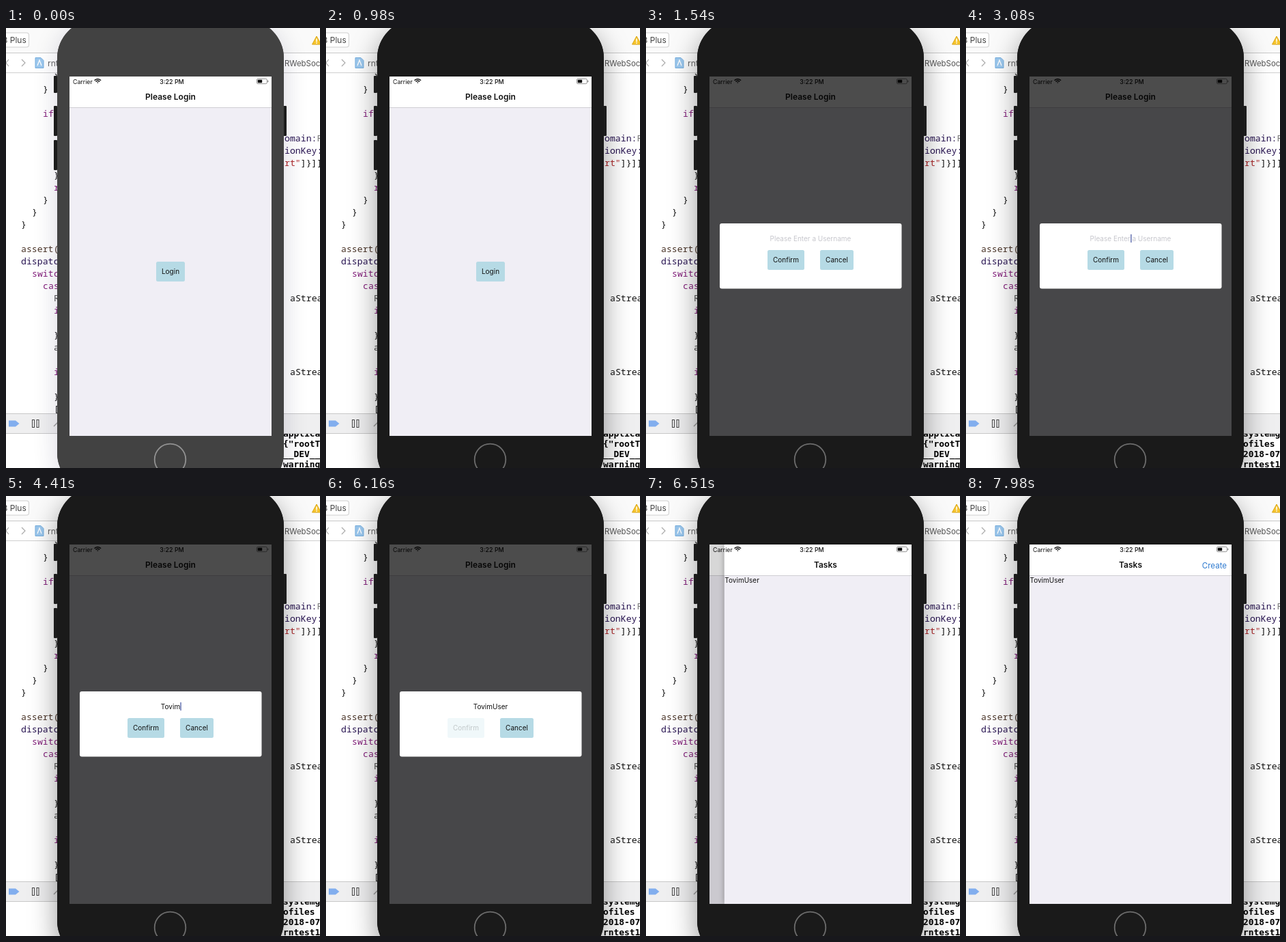
Recreate the animation shown at these times as an HTML page with a canvas. Size 460 by 644 pixels, loop 8 s.

```html
<!DOCTYPE html>
<html lang="en">
<head>
<meta charset="utf-8">
<title>Login flow</title>
<style>
html, body { margin: 0; width: 460px; height: 644px; overflow: hidden; background: #fff; }
canvas { display: block; }
</style>
</head>
<body>
<canvas id="stage" width="460" height="644"></canvas>
<script>
const ctx = document.getElementById('stage').getContext('2d');
const LOOP = 8000;
const MONO = '500 13.2px "Noto Sans Mono", "DejaVu Sans Mono", monospace';
const LOG = 'bold 12.9px "DejaVu Sans Mono", monospace';
const ui = (size, weight = 400) => `${weight} ${size}px Inter, Roboto, sans-serif`;
const INK = '#111', KEYWORD = '#84207c', CALL = '#261250', PAPER = '#f0eef5', SKY = '#b6dae5';
const SCREEN = { x: 93, y: 71, w: 296, h: 526 };
const USER = 'TovimUser';

// Event times in ms
const ACTIVATE = 700, PRESS_LOGIN = 1120, OPEN = 1210, FOCUS = 2600;
const PRESS_CONFIRM = 6080, PUSH = 6260, CREATE = 6720;
const KEYS = [3150, 3400, 3650, 3900, 4150, 4500, 4750, 5000, 5250];

const clamp = v => Math.min(1, Math.max(0, v));
const progress = (t, start, length) => clamp((t - start) / length);
const easeOut = p => 1 - (1 - p) ** 3;

function text(str, x, y, font, color = INK, align = 'left') {
  ctx.font = font;
  ctx.fillStyle = color;
  ctx.textAlign = align;
  ctx.fillText(str, x, y);
}

function rect(x, y, w, h, color, radius = 0) {
  ctx.fillStyle = color;
  ctx.beginPath();
  ctx.roundRect(x, y, w, h, radius);
  ctx.fill();
}

function poly(points, fill, stroke, width = 1) {
  ctx.beginPath();
  points.forEach(([x, y]) => ctx.lineTo(x, y));
  if (fill) {
    ctx.fillStyle = fill;
    ctx.fill();
  }
  if (stroke) {
    ctx.strokeStyle = stroke;
    ctx.lineWidth = width;
    ctx.stroke();
  }
}

function layer(draw, alpha = 1) {
  ctx.save();
  ctx.globalAlpha *= alpha;
  draw();
  ctx.restore();
}

const CODE = [
  [70, 72, '}'], [54, 90, '}'], [54, 126, 'if', KEYWORD], [70, 216, '}'], [70, 234, 'r', KEYWORD],
  [54, 252, '}'], [38, 270, '}'], [22, 288, '}'], [22, 324, 'assert(', '#4a3428'],
  [22, 342, 'dispatch', CALL], [38, 360, 'switch', KEYWORD], [54, 378, 'case', KEYWORD],
  [70, 396, 'R', '#555'], [70, 414, 'i', KEYWORD], [70, 450, '}'], [70, 468, 'a', '#444'],
  [70, 504, 'i', KEYWORD], [70, 540, '}'], [70, 558, '['],
  [408, 162, 'omain:', CALL], [455.5, 162, 'R', '#777'], [408, 180, 'ionKey:', CALL],
  [408, 198, 'rt"', '#b0282a'], [431.8, 198, ']}]]'], [416, 396, 'aStrea'], [416, 504, 'aStrea'],
];

function drawEditor(t) {
  rect(0, 0, 460, 644, '#fff');
  CODE.forEach(([x, y, str, color]) => text(str, x, y + 3.5, MONO, color));

  rect(0, 0, 460, 36, '#fafafa');
  rect(0, 36, 460, 1, '#c9c9c9');
  rect(0, 37, 460, 29, '#fff');
  rect(0, 65, 460, 1, '#cfcfcf');
  rect(-10, 6.5, 44, 22, '#cfcfcf', 4);
  rect(-10, 7.5, 43, 20, '#fff', 3);
  text('8 Plus', -5, 22, ui(12), '#444');
  poly([[455, 12], [461.5, 24], [448.5, 24], [455, 12]], '#f7c52d', '#d9a514');
  rect(454.3, 15.5, 1.5, 5, '#fff');
  rect(454.3, 21.5, 1.5, 1.5, '#fff');
  poly([[4, 46], [0, 51], [4, 56]], null, '#aaa', 1.2);
  poly([[23, 46], [28, 51], [23, 56]], null, '#aaa', 1.2);

  const faded = t > 1190 && t < 1400;
  poly([[43, 43.5], [51, 43.5], [55, 47.5], [55, 58.5], [43, 58.5], [43, 43.5]],
    faded ? '#c9c9d2' : '#9cc8ee', faded ? '#b0b0b8' : '#76aede');
  poly([[46, 55], [49, 47], [52, 55]], null, '#fff', 1.3);
  text('rntest1', 61, 55.5, ui(12), '#666');
  text('RWebSocket', 408, 55.5, ui(11.4), '#555');

  const log = t < FOCUS
    ? ['application', '{"rootTag', '__DEV__ ', 'warning ']
    : ['systemgroup', 'ofiles p', '2018-07-', 'rntest1['];
  log.forEach((line, i) => text(line, 406, 598 + i * 15, LOG, '#000'));

  rect(0, 564, 460, 29, '#efeff0');
  rect(0, 564, 460, 1, '#c8c8c8');
  rect(0, 593, 460, 1, '#c8c8c8');
  poly([[4, 574.5], [14, 574.5], [19.5, 579], [14, 583.5], [4, 583.5]], faded ? '#bcbcc8' : '#82aeee');
  for (const x of [39, 45.5]) {
    ctx.strokeStyle = '#444';
    ctx.lineWidth = 1;
    ctx.strokeRect(x - .5, 573.5, 3, 11);
  }
  poly([[70, 583], [77, 576], [84, 583]], null, '#999', 1.3);
}

function drawPhone(active) {
  const body = active ? '#1a1a1a' : '#424242';
  layer(() => {
    ctx.shadowColor = active ? 'rgba(0,0,0,.4)' : 'rgba(20,0,60,.16)';
    ctx.shadowBlur = active ? 40 : 36;
    ctx.shadowOffsetY = active ? 14 : 6;
    rect(75, -12, 332, 690, body, 56);
  });
  for (const [x, y, h] of [[70, 70, 25], [70, 114, 44], [70, 164, 44], [406, 114, 44]]) {
    rect(x, y, 5, h, '#1c1c1c', 1);
  }
  rect(75, -12, 332, 690, body, 56);
  ctx.strokeStyle = active ? '#6c6c6c' : '#929292';
  ctx.lineWidth = 1.8;
  ctx.beginPath();
  ctx.arc(240.5, 631.5, 22.8, 0, 7);
  ctx.stroke();
}

function drawStatusBar() {
  text('Carrier', 98, 81.5, ui(8.8));
  text('3:22 PM', 243, 81.5, ui(8.9, 500), INK, 'center');
  ctx.strokeStyle = INK;
  ctx.lineWidth = 1.5;
  for (const r of [1, 3.8, 6.3]) {
    ctx.beginPath();
    ctx.arc(134.3, 81, r, -Math.PI * .77, -Math.PI * .23);
    ctx.stroke();
  }
  ctx.strokeStyle = '#777';
  ctx.lineWidth = .8;
  ctx.beginPath();
  ctx.roundRect(367.4, 74.4, 15, 7.2, 1.8);
  ctx.stroke();
  rect(368.7, 75.7, 6.5, 4.6, INK, .7);
  rect(383.3, 76.7, 1.1, 2.6, '#777');
}

function drawPage(title) {
  rect(SCREEN.x, SCREEN.y, SCREEN.w, SCREEN.h, PAPER);
  rect(SCREEN.x, SCREEN.y, SCREEN.w, 45, '#fff');
  rect(SCREEN.x, 116, SCREEN.w, .8, '#c6c5ca');
  text(title, 241, 105, ui(12, 600), INK, 'center');
}

function drawButton(label, x, y, w, alpha = 1) {
  layer(() => {
    rect(x, y, w, 29, SKY, 2.5);
    text(label, x + w / 2, y + 18, ui(10), INK, 'center');
  }, alpha);
}

function drawDialog(t) {
  const opening = progress(t, OPEN + 50, 220);
  const scale = Math.max(.01, easeOut(opening)) * (1 - progress(t, PUSH - 60, 100));
  if (scale <= 0) return;
  layer(() => {
    ctx.translate(241, 358 - 24 * easeOut(opening));
    ctx.scale(scale, scale);
    ctx.translate(-241, -334);
    rect(108, 286, 266.5, 95.5, '#fff', 3);

    const count = KEYS.filter(k => k <= t).length;
    if (count) text(USER.slice(0, count), 241, 311.5, ui(10), INK, 'center');
    else text('Please Enter a Username', 241, 311.5, ui(10), '#c7c7cd', 'center');

    const blinkStart = count ? KEYS[count - 1] : FOCUS;
    if (t >= FOCUS && (t - blinkStart) % 1000 < 500) {
      ctx.font = ui(10);
      const half = ctx.measureText(USER.slice(0, count)).width / 2;
      rect(241 + half + .3, 302, 1.2, 12, '#3e4f9e');
    }
    drawButton('Confirm', 178, 325, 54, 1 - .8 * progress(t, PRESS_CONFIRM, 60));
    drawButton('Cancel', 255, 325, 49);
  });
}

function drawScreen(t) {
  ctx.beginPath();
  ctx.rect(SCREEN.x, SCREEN.y, SCREEN.w, SCREEN.h);
  ctx.clip();

  const phase = Math.max(0, t - PUSH) * .017;
  const rest = (1 + phase) * Math.exp(-phase);
  layer(() => {
    ctx.translate(-88 * (1 - rest), 0);
    drawPage('Please Login');
    if (t < OPEN) drawButton('Login', 220, 342, 42, 1 - .8 * progress(t, PRESS_LOGIN, 80));
  });

  if (t >= PUSH) {
    rect(SCREEN.x, SCREEN.y, SCREEN.w, SCREEN.h, `rgba(0,0,0,${.17 * (1 - rest)})`);
    layer(() => {
      ctx.translate(SCREEN.w * rest, 0);
      layer(() => {
        ctx.shadowColor = 'rgba(0,0,0,.35)';
        ctx.shadowBlur = 8;
        rect(SCREEN.x, SCREEN.y, SCREEN.w, SCREEN.h, PAPER);
      });
      drawPage('Tasks');
      text(USER, SCREEN.x + .5, 126.5, ui(10));
      if (t >= CREATE) text('Create', 382, 105.5, ui(11.5), '#2f7bd0', 'right');
    });
  }
  drawStatusBar();

  if (t >= OPEN) {
    const shade = .7 * progress(t, OPEN, 200) * (1 - progress(t, PUSH - 60, 120));
    rect(SCREEN.x, SCREEN.y, SCREEN.w, SCREEN.h, `rgba(0,0,0,${shade})`);
    drawDialog(t);
  }
}

function frame(now) {
  const t = now % LOOP;
  drawEditor(t);
  drawPhone(t >= ACTIVATE);
  layer(() => drawScreen(t));
  requestAnimationFrame(frame);
}
requestAnimationFrame(frame);
</script>
</body>
</html>
```
